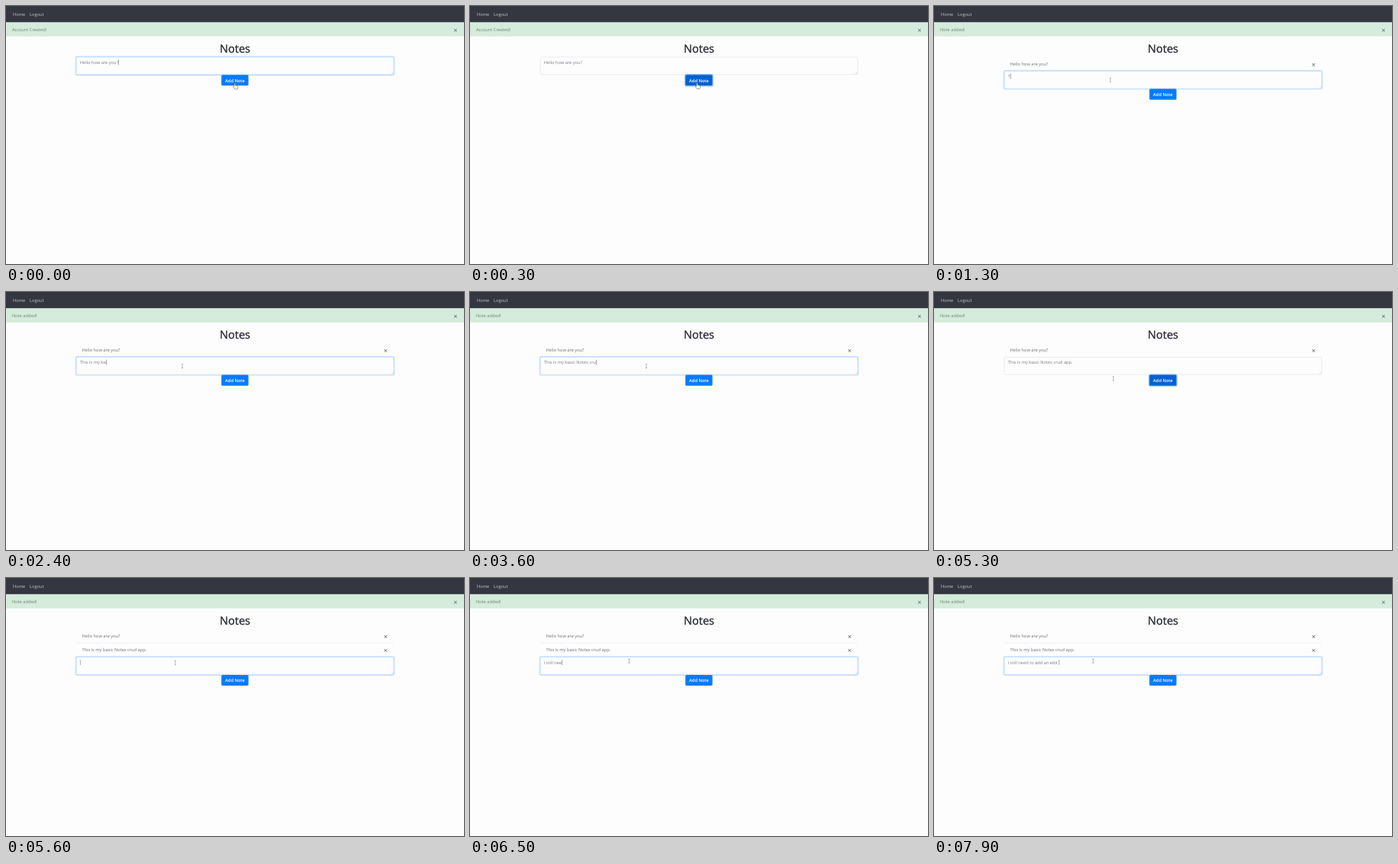
Recreate the animation shown at these times as an HTML page. Size 600 px wide and 338 px high, loop 8 s.

```html
<!DOCTYPE html>
<html lang="en">
<head>
<meta charset="utf-8">
<title>Notes</title>
<style>
html, body { margin: 0; width: 100%; height: 100%; overflow: hidden; background: #fefdfe; }
svg { display: block; width: 100%; height: 100%; }
text {
  font: 5.7px "Open Sans", "Noto Sans", sans-serif;
  text-rendering: geometricPrecision;
  white-space: pre;
  fill: #6c7176;
}
.nav text { fill: #c4c4c8; }
.title { font-size: 14.6px; fill: #24272c; stroke: #24272c; stroke-width: .3; text-anchor: middle; }
.close { font-size: 9px; font-weight: 600; text-anchor: middle; }
.label { font-weight: 600; fill: #fff; text-anchor: middle; }
#flash { fill: #6d8874; }
#typed { fill: #7b7f84; }
#field { fill: #fefdfe; stroke: #d3d8dd; stroke-width: .5; }
.focus #field { stroke: #9dc8f8; }
.glow { fill: none; stroke: #007bff; stroke-width: 1.2; stroke-opacity: 0; }
.focus .glow { stroke-opacity: .22; }
#caret { fill: #666; }
#face { fill: #057bff; }
#button.hover #face { fill: #0069d9; }
#button.down #face { fill: #0062d0; }
#button.down .glow { stroke-opacity: .45; }
#hand path { fill: #fff; stroke: #444; stroke-width: .5; stroke-linejoin: round; }
#beam path { fill: none; stroke: #777; stroke-width: .5; }
</style>
</head>
<body>
<svg viewBox="0 0 600 338" preserveAspectRatio="none">
  <rect width="600" height="338" fill="#fefdfe"/>
  <rect y="21" width="600" height="18.75" fill="#d5ebdb"/>
  <g class="nav">
    <rect width="600" height="21.2" fill="#353740"/>
    <text x="9" y="13">Home</text>
    <text x="31" y="13">Logout</text>
  </g>
  <text id="flash" x="7.9" y="33"></text>
  <text class="close" x="588.8" y="34.6">×</text>
  <text class="title" x="300" y="61">Notes</text>

  <g class="note">
    <text x="99.4" y="78">Hello how are you?</text>
    <text class="close" x="497.3" y="80">×</text>
  </g>
  <g class="note" transform="translate(0 18.375)">
    <path d="M92 66.7H508" stroke="#dfe0e2" stroke-width=".5"/>
    <text x="99.4" y="78">This is my basic Notes crud app.</text>
    <text class="close" x="497.3" y="80">×</text>
  </g>

  <g id="form">
    <g id="box">
      <rect class="glow" x="91.4" y="66.2" width="417.2" height="24.4" rx="1.9"/>
      <rect id="field" x="92.1" y="66.95" width="415.8" height="22.9" rx="1.4"/>
      <path d="M505 89L507.2 86.8M506.4 89.1L507.3 88.2" stroke="#999" stroke-width=".35"/>
      <text id="typed" x="96.8" y="76"></text>
      <rect id="caret" y="70.4" width=".55" height="6.8"/>
    </g>
    <g id="button">
      <rect class="glow" x="281.7" y="89.7" width="36.5" height="15.2" rx="2"/>
      <rect id="face" x="282.2" y="90.2" width="35.4" height="14.1" rx="1.5"/>
      <text class="label" x="300" y="99.5">Add Note</text>
    </g>
  </g>

  <g id="hand"><path d="M-.7 4.3V.7Q-.7 0 0 0T.7 .7V2.7Q2.4 2.5 3.7 3.4Q4.2 4 4 5L3.4 7.5H0L-2 5.1Q-2.5 4.1-1.6 3.9Z"/></g>
  <g id="beam"><path d="M-1-2.7H1M0-2.7V2.7M-1 2.7H1"/></g>
</svg>
<script>
const LOOP = 8000, STEP = 100, ROW = 18.375;
const $ = id => document.getElementById(id);
const noteRows = document.querySelectorAll('.note');

// Text is typed in bursts: [start, end, text reached]; between them the typist pauses.
const pages = [
  { at: 0, focus: 0, press: 200, bursts: [[0, 0, 'Hello how are you?']] },
  { at: 500, focus: 900, press: 5100, bursts: [
    [1300, 1800, 'This is '], [2100, 2400, 'my ba'], [2600, 3200, 'sic Notes'],
    [3400, 4000, ' crud app'], [4300, 4300, '.']] },
  { at: 5400, focus: 5600, press: LOOP, bursts: [
    [5900, 6500, 'I still nee'], [6600, 6900, 'd to a'], [7100, 7300, 'dd a'],
    [7500, 7500, 'n '], [7700, 7900, 'edit ']] }
];

// Pointer moves: [start, end, x, y]
const moves = [
  [0, 300, 297.5, 101], [500, 900, 231, 97], [4700, 5000, 299, 114],
  [5100, 5300, 235, 113.5], [5400, 5800, 208.5, 108.7]
];

const clamp = v => Math.max(0, Math.min(1, v));
const show = (el, on) => el.setAttribute('visibility', on ? 'visible' : 'hidden');

const textAt = (bursts, t) => bursts.map(([from, to, part]) =>
  part.slice(0, Math.round(part.length * clamp((t - from + STEP) / (to - from + STEP))))
).join('');

function pointerAt(t) {
  let x = 299.8, y = 101.3;
  for (const [from, to, toX, toY] of moves) {
    const k = clamp((t - from) / (to - from));
    x += (toX - x) * k;
    y += (toY - y) * k;
  }
  return [x, y];
}

function draw(t) {
  const n = pages.filter(p => p.at <= t).length - 1;
  const page = pages[n];
  const down = t >= page.press;
  const focus = t >= page.focus && !down;

  $('flash').textContent = n ? 'Note added!' : 'Account Created!';
  noteRows.forEach((row, i) => show(row, i < n));
  $('form').setAttribute('transform', `translate(0 ${n * ROW})`);
  $('box').classList.toggle('focus', focus);

  const typed = $('typed');
  typed.textContent = textAt(page.bursts, t);
  const width = typed.textContent ? typed.getComputedTextLength() : 0;
  $('caret').setAttribute('x', 96.9 + width);
  show($('caret'), focus && !(t >= 4600 && t < 4800));

  const [x, y] = pointerAt(t);
  const top = 90.2 + n * ROW;
  const over = x > 282.2 && x < 317.6 && y > top && y < top + 14;
  $('button').classList.toggle('hover', over && t > 0);
  $('button').classList.toggle('down', down);
  for (const id of ['hand', 'beam']) {
    $(id).setAttribute('transform', `translate(${x} ${y})`);
    show($(id), over === (id === 'hand'));
  }
}

const start = performance.now();
function tick() {
  const t = (performance.now() - start) % LOOP;
  draw(Math.floor(t / STEP) * STEP);
  requestAnimationFrame(tick);
}
draw(0);
requestAnimationFrame(tick);
</script>
</body>
</html>
```
